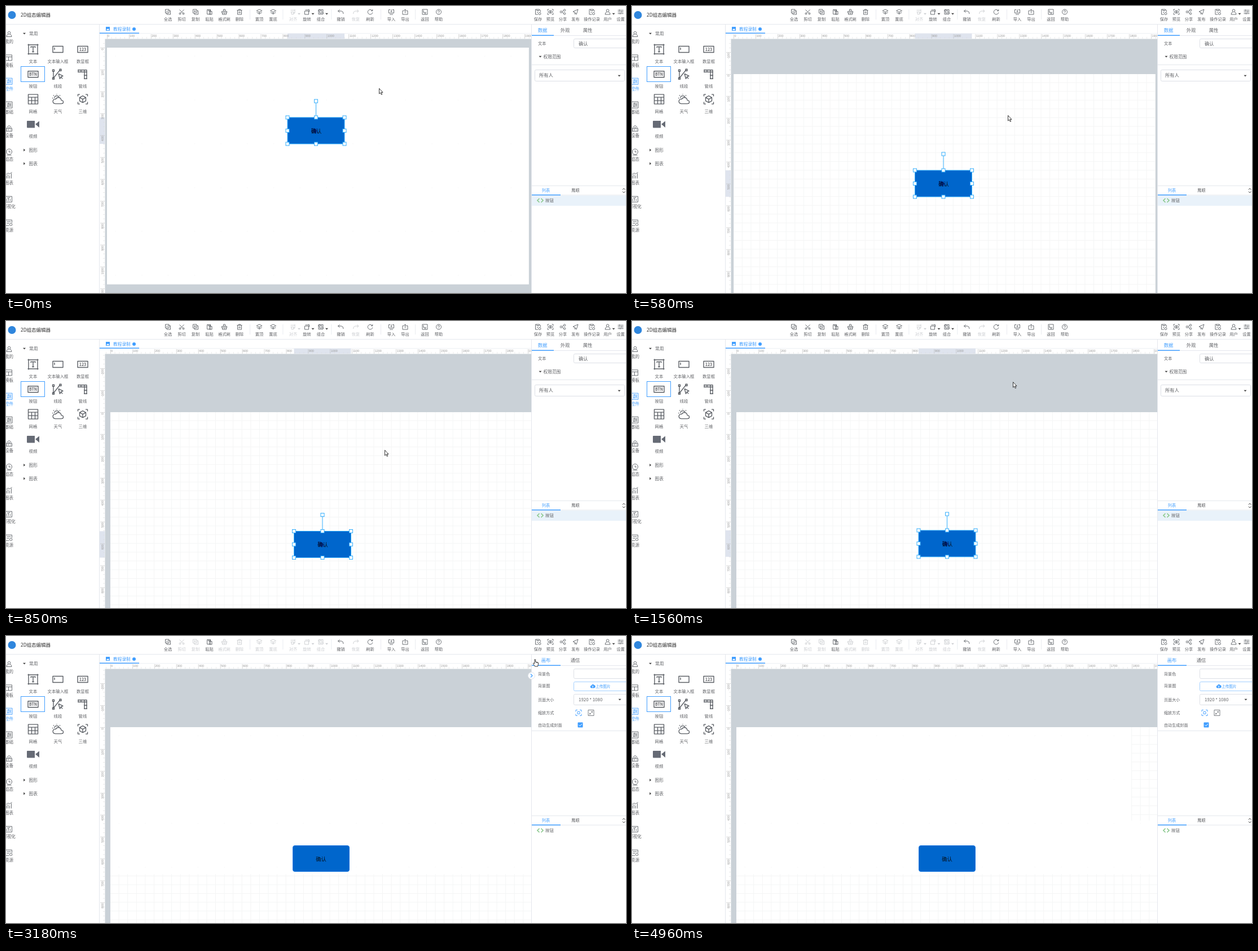
Recreate the animation shown at these times as an HTML page. Size 1099x510 px, loop 6480 ms.

```html
<!DOCTYPE html>
<html>
<head>
<meta charset="utf-8">
<style>
  html, body { margin: 0; width: 100%; height: 100%; overflow: hidden; background: #fff; }
  svg { display: block; width: 1099px; height: 510px; }
  text { font-family: "Noto Sans CJK SC", "Noto Sans CJK", sans-serif; fill: #606266; }
  .tick text { font: 5.4px "Liberation Sans", sans-serif; fill: #999; }
  .icon { fill: none; stroke: #5c6066; stroke-linejoin: round; }
  .off text { fill: #cbcdd1; }
  .off .icon { stroke: #cbcdd1; }
  .off .caret { fill: #cbcdd1; }
  .on text { fill: #409eff; }
  .on .icon { stroke: #409eff; }
</style>
</head>
<body>
<svg id="stage" viewBox="0 0 1099 510"></svg>
<script>
const LOOP = 6480, UNIT = 0.3895, BLUE = '#409eff', PALE_BLUE = '#a3d0ff', LINE = '#e4e7ed';
const PAGE_W = 1920 * UNIT, PAGE_H = 1080 * UNIT;

// Drawing helpers
const text = (x, y, str, size = 7.3, fill = '', anchor = 'middle') =>
  `<text x="${x}" y="${y + size * 0.37}" font-size="${size}" text-anchor="${anchor}"${fill && ` style="fill:${fill}"`}>${str}</text>`;
const left = (x, y, str, size, fill) => text(x, y, str, size, fill, 'start');
const rect = (x, y, w, h, fill, stroke = 'none', r = 0, sw = 1) =>
  `<rect x="${x}" y="${y}" width="${w}" height="${h}" rx="${r}" fill="${fill}" stroke="${stroke}" stroke-width="${sw}"/>`;
const icon = (x, y, d, w = 1) => `<path class="icon" transform="translate(${x} ${y})" d="${d}" stroke-width="${w}"/>`;
const caret = (x, y, dir = 0, fill = '#444') =>
  `<path class="caret" transform="translate(${x} ${y}) rotate(${dir})" d="M-2.5-1.3H2.5L0 1.6Z" fill="${fill}"/>`;
const group = (cls, body) => `<g class="${cls}">${body}</g>`;
const part = (id, body, attrs = '') => `<g id="${id}" ${attrs}>${body}</g>`;
const range = (from, to, step, fn) => {
  let out = '';
  for (let v = from; v <= to; v += step) out += fn(v);
  return out;
};

// Icon shapes, centred on the origin
const BOX = 'M-4-4H4V4H-4Z';
const COPY = 'M-4.5-4.5H2V2H-4.5ZM2-2H4.5V4.5H-2V2';
const CLIP = 'M-4-4H2V4H-4ZM-2-4V-2H1V-4M0-1H4.5V4.5H0Z';
const SCISSORS = 'M-4-4L3 3M4-4L-3 3M-4.5 3a1.5 1.5 0 1 0 3 0a1.5 1.5 0 1 0-3 0M1.5 3a1.5 1.5 0 1 0 3 0a1.5 1.5 0 1 0-3 0';
const BRUSH = 'M-4.5-1H4.5V1.5H-4.5ZM-1.5-1V-4.5H1.5V-1M-3.5 1.5V4.5H3.5V1.5M0 2V4';
const TRASH = 'M-4.5-3H4.5M-1.5-3V-4.5H1.5V-3M-3.5-3V4.5H3.5V-3M-1-1V2.5M1-1V2.5';
const LAYERS = 'M0-4.5L5-2L0 .5L-5-2ZM-4.5 1L0 3.5L4.5 1M0 0V4.5';
const ALIGN = 'M-4.5-3H3M-4.5 0H1V4H-3V0M3-4.5V2H0';
const ROTATE = 'M-4-1.5H3V4.5H-4ZM-3-3.5H4V0M2.5-5L4-3.5';
const GROUP = BOX + 'M-2-2H2V2H-2ZM-5-2H-3M3 2H5M-2-5V-3';
const UNDO = 'M-2-4L-5-1.5L-2 1M-5-1.5H1Q4.5-1 4.5 3.5';
const REDO = 'M2-4L5-1.5L2 1M5-1.5H-1Q-4.5-1-4.5 3.5';
const REFRESH = 'M3.8-2A4.3 4.3 0 1 0 4.3 1M4.3-4.5V-1.8H1.5';
const IMPORT = 'M-2-4H-4.5V2H4.5V-4H2M0-4.5V0M-1.5-1.5L0 0L1.5-1.5M-3 4.5H3';
const EXPORT = 'M-2-2H-4.5V4.5H4.5V-2H2M0 2V-4.5M-1.8-2.7L0-4.5L1.8-2.7';
const BACK = 'M-4.5-4.5H4.5V4.5H-4.5ZM-2.5-3V1H2.5M-1 3H2';
const HELP = 'M-4.5 0a4.5 4.5 0 1 0 9 0a4.5 4.5 0 1 0-9 0M-1.5-1Q-1.5-2.5 0-2.5T1.5-1Q1.5 0 0 .7V1.2M0 2.3V3';
const SAVE = 'M4.5 0V-2.5L2.5-4.5H-4.5V4.5H0M-2-4.5V-2H2V-4.5M-2 1H0M1 3a2 2 0 1 0 4 0a2 2 0 1 0-4 0';
const EYE = 'M-5-2V-4.5H-2.5M2.5-4.5H5V-2M-5 2V4.5H-2.5M2.5 4.5H5V2M-4.5 0Q0-4.5 4.5 0Q0 4.5-4.5 0M-1.2 0a1.2 1.2 0 1 0 2.4 0a1.2 1.2 0 1 0-2.4 0';
const SHARE = 'M-4.8 0a1.7 1.7 0 1 0 3.4 0a1.7 1.7 0 1 0-3.4 0M1.4-3a1.7 1.7 0 1 0 3.4 0a1.7 1.7 0 1 0-3.4 0M1.4 3a1.7 1.7 0 1 0 3.4 0a1.7 1.7 0 1 0-3.4 0M-1.5-.7L1.5-2.3M-1.5.7L1.5 2.3';
const SEND = 'M4.5-4.5L-4.5-.5L-1 1L1.5 4.5ZM-1 1V4.5';
const USER = 'M-2.3-2.3a2.3 2.3 0 1 0 4.6 0a2.3 2.3 0 1 0-4.6 0M-1.3 0Q-4.5 1-4.5 4.5H4.5Q4.5 1 1.3 0';
const SLIDERS = 'M-5-3H5M-5 0H5M-5 3H5M-2-4.2V-1.8M2-1.2V1.2M-1 1.8V4.2';
const PANEL = 'M-6-5H5V5H-6ZM-6-1.5H5M-1-1.5V5';
const CONTROLS = 'M-6-5.5H5.5V5.5H-6ZM-4-2.5H4M-4 0H4M-4 2.5H4M-1-3.8V-1.2M2-1.2V1.2M-2 1.2V3.8';
const DEVICE = 'M-5 0H5V5H-5ZM-4-1Q0-9 4-1M-2 0Q0-4 2 0M-3 2.5H0M2 2.5H3.5';
const TARGET = 'M-5-.5a5 5 0 1 0 10 0a5 5 0 1 0-10 0M0-3V0H2.5M-4 5.5H4';
const CHART = 'M-5 5V0M-2 5V-2M1 5V0M4 5V-4M-5-2L-2-4.5L1-3L5-6';
const PICTURE = 'M-6-5H5V5H-6ZM-4 3V0M-1 3V-2M2 3V0M-4-2L2-3';
const SOURCE = 'M5 0V-5H-6V5H0M-4-2H3M-4 1H0M1 3a2.2 2.2 0 1 0 4.4 0a2.2 2.2 0 1 0-4.4 0';

// [label, x, icon, 1 = needs a selection / 2 = always off, has menu]
const TOOLS = [
  ['全选', 287, COPY + 'M-3-1.5L-1.5 0L1-3'], ['剪切', 311.5, SCISSORS, 1], ['复制', 336, COPY + 'M-1.2-3V.5M-3-1.2H.5', 1],
  ['粘贴', 360.5, CLIP], ['格式刷', 387, BRUSH, 1], ['删除', 414, TRASH, 1], ['置顶', 449, LAYERS, 1], ['置底', 473.5, LAYERS, 1],
  ['对齐', 509, ALIGN, 2, 1], ['旋转', 533.5, ROTATE, 1, 1], ['组合', 558, GROUP, 1, 1], ['撤销', 593.5, UNDO],
  ['恢复', 620, REDO, 2], ['刷新', 645.5, REFRESH], ['导入', 683, IMPORT], ['导出', 707.5, EXPORT], ['返回', 742.5, BACK],
  ['帮助', 767, HELP], ['保存', 943, SAVE], ['预览', 965, EYE], ['分享', 987, SHARE], ['发布', 1009.5, SEND],
  ['操作记录', 1038.5, SAVE], ['用户', 1066.5, USER, 0, 1], ['设置', 1089.5, SLIDERS]
];
const SIDE = [['我的', USER], ['模板', PANEL], ['控件', CONTROLS], ['基础', CONTROLS], ['设备', DEVICE], ['组态', TARGET],
  ['图表', CHART], ['可视化', PICTURE], ['资源', SOURCE]];
const WIDGETS = [
  ['文本', 'M-8-8H8V8H-8ZM-4-3V-4.5H4V-3M0-4.5V4.5M-2 4.5H2M-9.5-8H-6.5M6.5-8H9.5M-9.5 8H-6.5M6.5 8H9.5M-8-9.5V-6.5M8-9.5V-6.5M-8 6.5V9.5M8 6.5V9.5'],
  ['文本输入框', 'M-9-5.5H9V5.5H-9ZM-6-3V1'],
  ['数显框', 'M-9-5.5H9V5.5H-9Z', '123'],
  ['按钮', 'M-9-5.5H9V5.5H-9Z', 'BTN'],
  ['线段', 'M-8-6V7L4-8M-9.5-8H-6.5V-5H-9.5ZM-9.5 6H-6.5V9H-9.5ZM3-9H6V-6H3ZM1-1L9 3L5.5 4.5L8 8M1-1L3.5 8L5.5 4.5'],
  ['管线', 'M-8-8.5V-3M-8-7.5H7V8M-8-4H3V8M2 8H8M2 2H8M-3-8V-4M3-8V-4H8'],
  ['网格', 'M-8.5-8.5H8.5V8.5H-8.5ZM-8.5-3.5H8.5M-8.5 2.5H8.5M-2.5-3.5V8.5M3.5-3.5V8.5'],
  ['天气', 'M-5 8Q-10 7-8.5 2Q-7-1-4 0Q-1-5 4-2Q6 0 6 2Q10 2 9.5 6Q9 8 6 8ZM-6-2Q-6-6-2-6Q1-6 2-4M-2-9V-8M-8-7L-7-6M4-7L3-6M-10-2H-8.5'],
  ['三维', 'M0-6L5.5-3V3L0 6L-5.5 3V-3ZM-5.5-3L0 0L5.5-3M0 0V6M-8.5-5V-8.5H-5M5-8.5H8.5V-5M-8.5 5V8.5H-5M5 8.5H8.5V5'],
  ['视频', '']
];

const tool = ([label, x, d, need, menu]) =>
  group(need === 2 ? 'off' : need ? 'need' : '', icon(x, 10.5, d, 0.9) + text(x, 23.5, label, 7.2) + (menu ? caret(x + 10.5, 14) : ''));
const side = ([label, d], i) =>
  group(i === 2 ? 'on' : '', icon(5.5, 50 + i * 41.9, d, 0.9) + text(5.5, 63 + i * 41.9, label, 7.5));
const widget = ([label, d, caption], i) => {
  const x = 48 + i % 3 * 44, y = 77 + (i / 3 | 0) * 44.3;
  return icon(x, y, d, 1.4) + text(x, y + 21.3, label, 7.4) +
    (caption ? `<text x="${x}" y="${y + 2.6}" font-size="7" font-weight="700" text-anchor="middle">${caption}</text>` : '');
};
const tabs = (y, rule, labels, xs, width, size = 8.3) =>
  rect(931, rule, 168, 1, LINE) + rect(931, rule - 0.5, width, 1.5, BLUE) +
  labels.map((s, i) => text(xs[i], y, s, size, i ? '' : BLUE)).join('');

function topBar() {
  return '<circle cx="10.5" cy="16" r="7" fill="#2f86dd"/>' + left(26, 16, '2D组态编辑器', 8.5, '#333') +
    TOOLS.map(tool).join('') + [432, 490.5, 576.5, 664, 725].map(x => rect(x, 6, 0.8, 18, LINE)).join('') + rect(0, 32, 1099, 1, LINE);
}
function leftPanel() {
  return SIDE.map(side).join('') + caret(32.5, 49) + left(41, 49, '常用', 7.7) +
    rect(26.5, 107.5, 42, 27, '#fff', BLUE) + WIDGETS.map(widget).join('') +
    '<path d="M38 204H51V216.500H38Q37 216.500 37 215V205Q37 204 38 204ZM52 210L59 204.500V216Z" fill="#666b75"/>' +
    caret(32.5, 256, -90) + left(40.5, 256, '图形', 7.7) + caret(32.5, 280, -90) + left(40.5, 280, '图表', 7.7) +
    rect(165, 33, 1, 477, LINE);
}
function rightPanel() {
  const field = (y, h, stroke = '#dcdfe6') => rect(1006.5, y + 0.5, 100, h, '#fff', stroke, 2);
  const data = tabs(43, 52, ['数据', '外观', '属性'], [951, 991, 1031], 40) + left(943, 66, '文本', 7.2) + field(58, 16) +
    left(1015, 66.5, '确认', 8.2) + caret(947, 90) + left(952.5, 90, '权限范围', 7.7) + rect(931, 104, 168, 1, LINE) +
    rect(937.5, 113.5, 159, 20, '#fff', '#dcdfe6', 2) + left(945, 123, '所有人', 8.3) + caret(1087, 124);
  const labels = ['背景色', '背景图', '页面大小', '缩放方式', '自动生成封面'], rows = [67, 88.5, 113, 136.5, 158];
  const canvas = tabs(43, 52, ['画布', '通信'], [957, 1009], 52) + labels.map((s, i) => left(943, rows[i], s, 7.1)).join('') +
    field(58, 17) + field(81, 16, PALE_BLUE) + left(1045, 89.5, '上传图片', 6.7, BLUE) +
    `<path d="M1037.500 92.500a2.300 2.300 0 0 1 0-4.500a3 3 0 0 1 5-1a2.800 2.800 0 0 1 0 5.500Z" fill="${BLUE}"/>` +
    '<path d="M1040 92V88.500M1038.500 90L1040 88.500L1041.500 90" stroke="#fff" fill="none" stroke-width=".8"/>' +
    field(103, 19) + left(1015, 113, '1920 * 1080', 7.9) + caret(1088, 113) +
    group('on', icon(1015, 136.5, 'M-5-2V-5H-2M2-5H5V-2M-5 2V5H-2M2 5H5V2M-2-2H2V2H-2Z', 0.9)) +
    icon(1037, 136.5, 'M-5-5H5V5H-5ZM1-1L3.500-3.500M1-3V-1H3M-1 1L-3.500 3.500M-1 3V1H-3', 0.8) +
    rect(1013.5, 153.5, 9, 9, BLUE, 'none', 1) + '<path d="M1015.500 158L1017.500 160L1020.800 156" fill="none" stroke="#fff"/>' +
    rect(931, 168, 168, 1, LINE);
  return rect(931, 33, 168, 477, '#fff') + part('dataPanel', data) + part('canvasPanel', canvas) +
    rect(931, 319, 168, 1, LINE) + tabs(327.5, 335.5, ['列表', '鹰眼'], [957, 1009.5], 52, 7.2) +
    '<path d="M1093 326.500L1095.200 324L1097.400 326.500M1093 329.500L1095.200 332L1097.400 329.500" fill="none" stroke="#444"/>' +
    part('rowTint', rect(932, 337, 167, 18, '#e9f2fa')) +
    '<path d="M945.500 342L942 345.500L945.500 349M948.500 342L952 345.500L948.500 349" fill="none" stroke="#8cc98f" stroke-width="1.7"/>' +
    left(956, 345.5, '按钮', 7.4) + rect(931, 33, 1, 477, LINE);
}
function workspace() {
  const at = v => +(v * UNIT).toFixed(2);
  const ruler = (tick, label) => group('tick', range(-500, 2100, 20, v => tick(at(v), v % 100 ? 3 : 8)) + range(-500, 2100, 100, v => label(at(v), v)));
  const across = ruler((p, n) => rect(p, 58 - n, 0.6, n, n > 3 ? '#bbb' : '#ddd'),
    (p, v) => `<text x="${p + 1.3}" y="55">${v}</text>`);
  const down = ruler((p, n) => rect(175 - n, p, n, 0.6, n > 3 ? '#bbb' : '#ddd'),
    (p, v) => `<text transform="translate(172.500 ${p + 1.5}) rotate(-90)" text-anchor="end">${v}</text>`);
  const step = 40 * UNIT;
  const lines = rect(0, 0, PAGE_W, PAGE_H, 'url(#gridLines)');
  return `<defs>
    <pattern id="gridLines" width="${step}" height="${step}" patternUnits="userSpaceOnUse"><path d="M${step - 0.5} 0V${step}M0 ${step - 0.5}H${step}" stroke="#f4f5f5"/></pattern>
    <pattern id="gridDots" width="${step * 3}" height="${step * 5}" patternUnits="userSpaceOnUse">${rect(step - 1, step - 1, 1, 1, '#f0f0f0')}</pattern>
    <clipPath id="view"><path d="M176 59H931V510H176Z"/></clipPath>
    <clipPath id="acrossClip"><path d="M176 49H931V58H176Z"/></clipPath>
    <clipPath id="downClip"><path d="M166 59H175V510H166Z"/></clipPath>
    <clipPath id="lower"><path d="M176 423H931V510H176Z"/></clipPath>
    <clipPath id="corner"><path d="M885 162H931V328H885Z"/></clipPath></defs>` +
    rect(175.5, 58.5, 755.5, 451.5, '#cad1d7') +
    `<g clip-path="url(#view)">${part('page', rect(0, 0, PAGE_W, PAGE_H, '#fff') + rect(0, 0, PAGE_W, PAGE_H, 'url(#gridDots)'))}
      ${part('grid', `<g class="page">${lines}</g>`)}
      ${part('gridLower', `<g class="page">${lines}</g>`, 'clip-path="url(#lower)"')}
      ${part('gridCorner', `<g class="page">${lines}</g>`, 'clip-path="url(#corner)"')}</g>` +
    `<g clip-path="url(#acrossClip)">${part('markX', rect(0, 49, 101, 9, '#dfe4ee'))}${part('across', across)}</g>` +
    `<g clip-path="url(#downClip)">${part('markY', rect(166, 0, 9, 47, '#dfe4ee'))}${part('down', down)}</g>` +
    part('button', rect(0.5, 0.5, 100, 46, '#0066cc', '#1a78e0', 3.5) + text(50.5, 24.2, '确认', 9.2, '#05101c') + part('picked', picked())) +
    `<path d="M177 37H184V44H177ZM178 43H183.300L181 40L179.800 41.500L179 40.800Z" fill="${BLUE}" fill-rule="evenodd"/>` +
    left(190, 41, '教程录制', 7.7, BLUE) + `<circle cx="227" cy="41" r="3" fill="${BLUE}"/>` +
    rect(166, 48.5, 765, 0.7, LINE) + rect(166, 47.5, 70, 1.5, BLUE);
}
function picked() {
  const spots = [[50.5, -29]];
  for (const x of [0, 50.5, 101]) for (const y of [0, 23.5, 47]) if (x !== 50.5 || y !== 23.5) spots.push([x, y]);
  return rect(0, 0, 101, 47, '#0066cc', '#35aefc') + text(51, 24.5, '确认', 9.2, '#05101c') +
    text(46.5, 23.5, '确', 9.2, '#00104a') + text(50, 23.5, '认', 7, '#000a70') +
    '<path d="M50.500-29V0" stroke="#35aefc"/>' + spots.map(([x, y]) => rect(x - 3, y - 3, 6, 6, '#fff', '#35aefc')).join('');
}

const CURSORS = part('arrow', '<path d="M.5.5V10L2.700 8L4.300 11.600L5.800 10.900L4.200 7.500H7Z" fill="#fff" stroke="#222" stroke-width=".9"/>') +
  part('hand', '<path d="M3 .8Q4.500 0 4.700 1.500V5L9 6Q10 6.500 9.500 9L8.500 13H3.500L.6 8.500Q0 7 1.500 7L3 8.200Z" fill="#fff" stroke="#222" stroke-width=".9"/><path d="M6.300 5.500V7M8 6V7.300" stroke="#222" stroke-width=".7"/>');
const CHEVRON = part('chevron', `<circle cx="931.500" cy="70.500" r="6" fill="#fff" stroke="${LINE}"/><path d="M930 67.500L933 70.500L930 73.500" fill="none" stroke="${BLUE}" stroke-width="1.200"/>`);

document.getElementById('stage').innerHTML = workspace() + leftPanel() + rightPanel() + topBar() + CHEVRON + CURSORS;

// Step tables: each row holds from its time until the next
const VIEW = [[0, 179, 74, 499, 198], [580, 180.2, 121, 501.5, 292], [700, 182.5, 144, 506.5, 338],
  [850, 185, 162, 510.5, 373.5], [980, 185, 162, 508, 372]];
const POINTER = [[0, 661, 146, 'arrow'], [150, 665, 141, 'arrow'], [430, 666, 148, 'arrow'], [580, 666, 194, 'arrow'],
  [700, 669, 213, 'arrow'], [850, 671, 229, 'arrow'], [1410, 674, 210, 'arrow'], [1560, 675, 108, 'arrow'],
  [1710, 677, 106, 'arrow'], [1960, 678, 105, 'arrow'], [2490, 676, 106, 'arrow'], [2630, 696, 107, 'arrow'],
  [2790, 890, 71, 'arrow'], [2940, 927, 52, 'arrow'], [3060, 934, 44, 'hand'], [3180, 934, 41, 'hand'],
  [3420, 946, 41, 'hand'], [3570, 948, 38, 'hand'], [3810, 952, 31, 'hand'], [3960, 946, 200, 'arrow'],
  [4110, 1000, 171, 'arrow'], [4260, 980, 2, 'arrow'], [4380, 985, 40, 'arrow'], [4530, 1022, 249, 'arrow'],
  [4660, 1005, 103, 'arrow'], [4810, 1091, 184, 'arrow'], [4960, 0, 0, '']];
const CHEVRON_ON = [[0, 0], [2940, 1], [3570, 0], [4110, 1], [4260, 0], [4530, 1], [4960, 0]];

const el = id => document.getElementById(id);
const pick = (table, t) => table.findLast(row => row[0] <= t);
const move = (node, x, y) => node.setAttribute('transform', `translate(${x} ${y})`);
const show = (id, on) => { el(id).style.display = on ? '' : 'none'; };
const pages = [el('page'), ...document.querySelectorAll('.page')];
const needing = [...document.querySelectorAll('.need')];

function render(t) {
  const [, px, py, bx, by] = pick(VIEW, t), selected = t < 1960;
  pages.forEach(node => move(node, px, py));
  move(el('across'), px, 0);
  move(el('down'), 0, py);
  move(el('markX'), bx, 0);
  move(el('markY'), 0, by);
  move(el('button'), bx, by);
  for (const id of ['markX', 'markY', 'picked', 'dataPanel', 'rowTint']) show(id, selected);
  show('canvasPanel', !selected);
  needing.forEach(node => node.classList.toggle('off', !selected));
  show('grid', selected && t >= 580);
  show('gridLower', !selected);
  show('gridCorner', t >= 3300);
  show('chevron', pick(CHEVRON_ON, t)[1]);
  const [, x, y, shape] = pick(POINTER, t);
  for (const id of ['arrow', 'hand']) {
    show(id, id === shape);
    move(el(id), x, y);
  }
}

const start = performance.now();
function frame() {
  render((performance.now() - start) % LOOP);
  requestAnimationFrame(frame);
}
frame();
</script>
</body>
</html>
```
